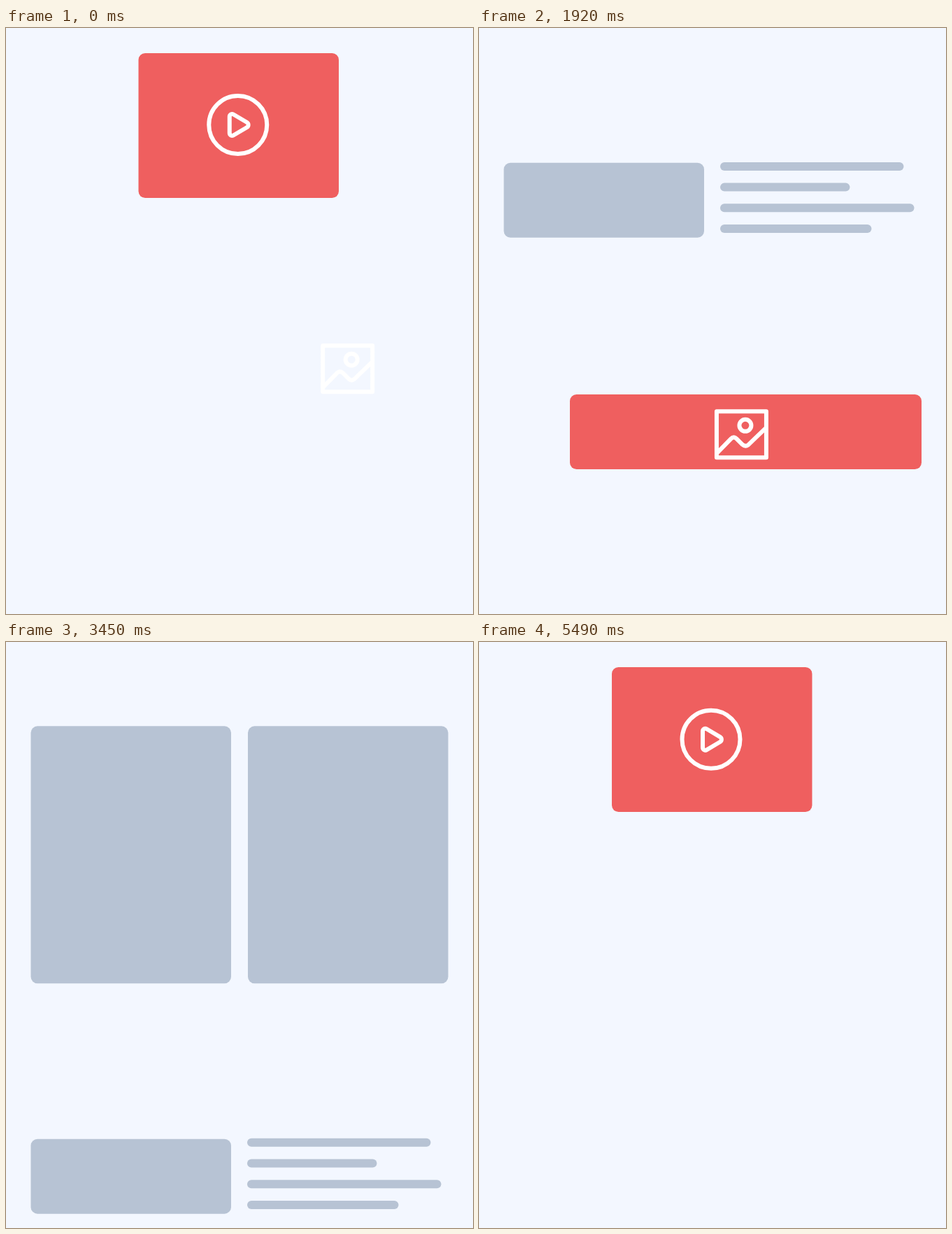
An HTML page with a canvas for the animation above (5.61 s loop, 668 by 838 pixels).

```html
<!DOCTYPE html>
<html lang="en">
<head>
<meta charset="utf-8">
<title>Layout builder</title>
<style>
  html, body { margin: 0; width: 100%; height: 100%; overflow: hidden; background: #f3f7ff; }
  canvas { display: block; }
</style>
</head>
<body>
<canvas id="stage" width="668" height="838"></canvas>
<script>
const W = 668, H = 838, LOOP = 5610, STEP = 30, MOVE = 230;
const BG = '#f3f7ff', GRAY = '#b7c3d4', RED = '#ef5f5f';
const L = 35.5, R = 346, HALF = 286.5;
const ctx = document.getElementById('stage').getContext('2d');

const part = (t, start, length) => Math.min(1, Math.max(0, (t - start) / length));
const mix = (a, b, k) => a + (b - a) * k;
const inOut = p => p < 0.5 ? 4 * p ** 3 : 1 - 4 * (1 - p) ** 3;
// Remaining share of the way in, and covered share of the way out.
const enter = (t, start) => (1 - part(t, start, MOVE)) ** 3;
const leave = (t, start) => part(t, start, MOVE) ** 3;

function box(x, y, w, h, r = 9.5, fill = GRAY) {
  ctx.fillStyle = fill;
  ctx.beginPath();
  ctx.roundRect(x, y, w, h, r);
  ctx.fill();
}

function lines(x, y, widths) {
  widths.forEach((w, i) => box(x, y + i * 29.7, w, 12, 6));
}

const sideText = y => lines(345, y, [262.5, 185.5, 277.5, 216.5]);
const card = (x, y, h = 107) => box(x, y, HALF, h);

function textRow(y) {
  card(L, y);
  sideText(y - 0.8);
}

function tallRow(y) {
  card(L, y, 144.5);
  sideText(y + 22);
}

const gridPage = [
  () => box(L, 38, 597, 276),
  () => lines(34.5, 334, [537.5, 404.5, 435.5]),
  () => card(L, 433.8),
  () => { card(L, 564.7); card(R, 564.7); },
  () => textRow(695.6)
];
const columnPage = [
  () => textRow(695.6),
  () => textRow(433.8),
  () => { card(L, 36, 368); card(R, 36, 368); }
];
const videoPage = [
  () => { box(L, 36, 131.5, 207); box(501, 36, 131.5, 207); },
  () => box(L, 266.7, 597, 30.5),
  () => tallRow(321),
  () => tallRow(489.2),
  () => tallRow(657.5)
];

function shifted(x, y, draw) {
  ctx.save();
  ctx.translate(x, y);
  draw();
  ctx.restore();
}

function page(groups, offset) {
  groups.forEach((draw, i) => shifted(...offset(i), draw));
}

function icon(x, y, path, alpha = 1) {
  shifted(x, y, () => {
    ctx.globalAlpha = alpha;
    ctx.strokeStyle = '#fff';
    ctx.lineWidth = 6;
    ctx.lineJoin = 'round';
    ctx.stroke(path);
  });
}

const playIcon = new Path2D('M41.5 0A41.5 41.5 0 1 1 -41.5 0A41.5 41.5 0 1 1 41.5 0Z' +
  'M-12 -11.5c0 -3 3 -5 5.5 -3.5l19.5 11.5c2.5 1.5 2.5 5.5 0 7l-19.5 11.5c-2.5 1.5 -5.5 -.5 -5.5 -3.5Z');
const imageIcon = new Path2D('M-35.5 -33H35.5V33H-35.5Z' +
  'M14 -13A8.5 8.5 0 1 1 -3 -13A8.5 8.5 0 1 1 14 -13Z' +
  'M-35.5 27L-15 6Q-11 2 -7 6L1.5 14.5Q5.5 18 9.5 15L35.5 -10');

const VIDEO = [189.5, 36, 286.5, 207], TILE = [346.3, 433.8, 286.7, 107], BANNER = [36, 563.3, 597, 107];

function redCard(t) {
  if (t >= 3840) {
    shifted(-W * enter(t, 3840), 0, () => {
      box(190, 36, 286.5, 207, 9.5, RED);
      icon(332, 139.3, playIcon);
    });
    return;
  }
  const first = inOut(part(t, 30, 400)), second = inOut(part(t, 1740, 312));
  const rect = VIDEO.map((v, i) => mix(mix(v, TILE[i], first), BANNER[i], second));
  const lead = inOut(part(t, 1736, 312));
  shifted(0, H * leave(t, 3240), () => {
    box(...rect, 9.5, RED);
    if (first < 1) {
      icon(rect[0] + rect[2] / 2 - 1, rect[1] + rect[3] / 2 - 1, playIcon, 1 - part(t, 30, 180));
    }
    icon(mix(488.7, 332.2, lead), mix(487.2, 617.2, lead), imageIcon);
  });
}

function draw(t) {
  ctx.fillStyle = BG;
  ctx.fillRect(0, 0, W, H);
  if (t < 1800) {
    page(gridPage, i => [W * (enter(t, 60 + i * 70) - leave(t, 1250 + i * 70)), 0]);
  } else if (t < 3600) {
    page(columnPage, i => [0, H * (leave(t, [3240, 3291, 3343][i]) - enter(t, 1884 + i * 85))]);
  } else if (t >= 3840) {
    const out = i => i ? leave(t, 5007 + i * 63) : t < 5070 ? 0 : leave(t, 4970);
    page(videoPage, i => [-W * enter(t, 3840 + i * 70), -H * out(i)]);
  }
  redCard(t);
}

function tick() {
  const t = performance.now() % LOOP;
  draw(t - t % STEP);
  requestAnimationFrame(tick);
}
tick();
</script>
</body>
</html>
```
